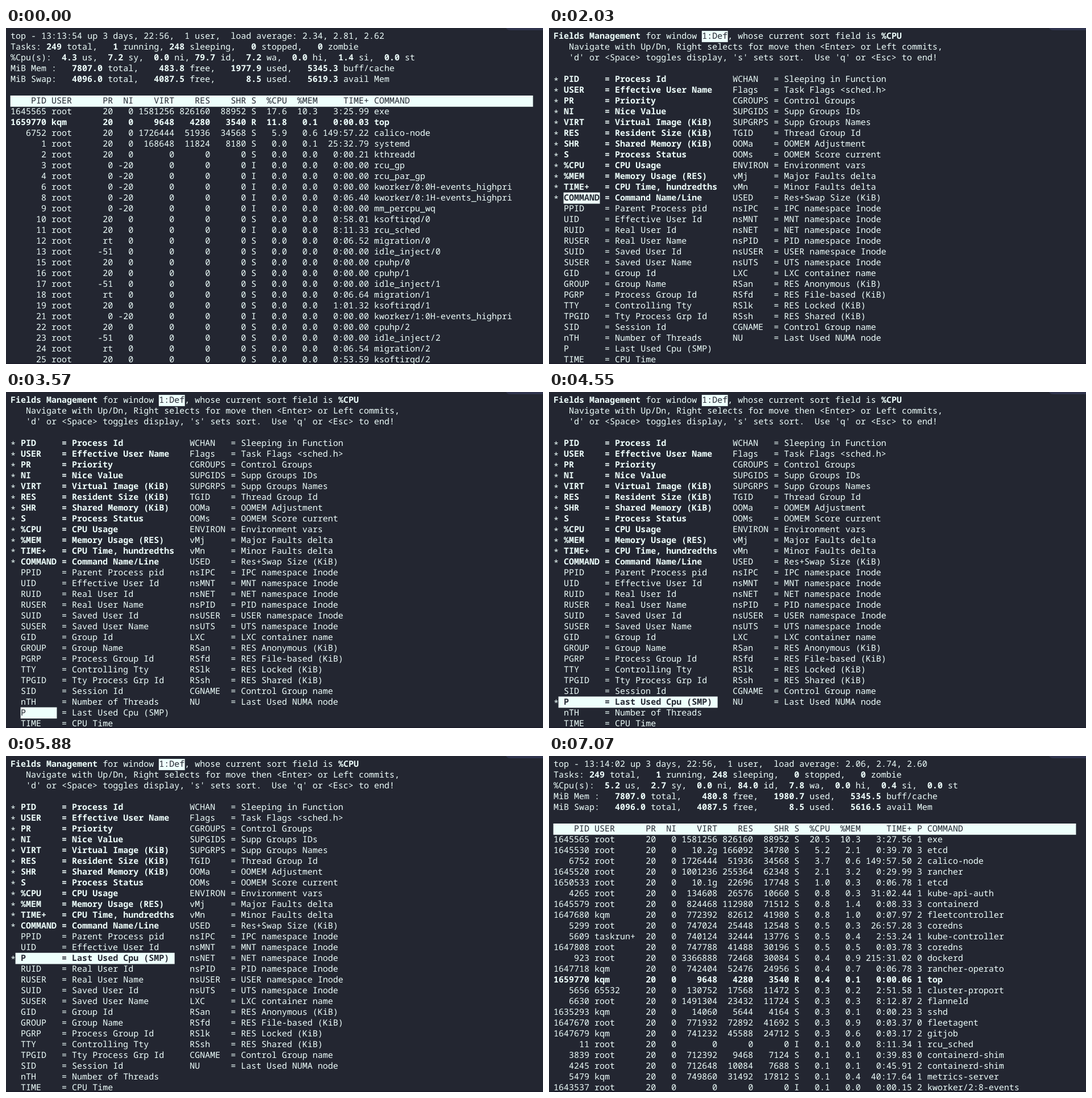
These frames come from a looping animation (945x592 px, 8.47 s). An HTML page:

```html
<!DOCTYPE html>
<html lang="en">
<head>
<meta charset="utf-8">
<title>top: fields management</title>
<style>
  html, body { margin: 0; width: 100%; height: 100%; overflow: hidden; background: #232631; }
  svg { display: block; width: 945px; height: 592px; }
  text {
    font-family: "Noto Sans Mono", monospace;
    white-space: pre;
    text-rendering: geometricPrecision;
    font-variant-ligatures: none;
  }
</style>
</head>
<body>
<svg id="stage" viewBox="0 0 945 592">
  <rect width="945" height="592" fill="#232631"/>
  <path d="M880 0H945V4H888Q882 4 880 0Z" fill="#30344d"/>
  <rect y="590.5" width="945" height="1.5" fill="#1b1a29"/>
  <g id="screen"></g>
</svg>
<script>
const LOOP = 8470, OPEN = 420, TOGGLE = 3920, GRAB = 4130, CLOSE = 7070;
const LEFT = 8, TOP = 5.5, CELL = 9.01, LINE = 18.98, BASE = 13.8, PAD = 0.4;
const BG = '#232631', FG = '#eefffc';
const FIRST_ROW = 4, START = 8;

const screen = document.getElementById('screen');

// Font size at which one character fills one terminal cell
const pen = document.createElement('canvas').getContext('2d');
pen.font = '100px "Noto Sans Mono", monospace';
const SIZE = CELL / (pen.measureText('0').width / 100);

function add(tag, attrs, text) {
  const el = document.createElementNS('http://www.w3.org/2000/svg', tag);
  for (const k in attrs) el.setAttribute(k, attrs[k]);
  if (text) el.textContent = text;
  screen.appendChild(el);
}

const bar = (row, col, cols) => add('rect', {
  x: LEFT + col * CELL - PAD, y: TOP + row * LINE - PAD,
  width: cols * CELL + 2 * PAD, height: LINE + 2 * PAD, fill: FG
});

function print(row, col, str, bold, fill = FG) {
  for (const m of str.matchAll(/\S+/g)) {
    add('text', {
      x: LEFT + (col + m.index) * CELL, y: TOP + row * LINE + BASE,
      'font-size': SIZE, 'font-weight': bold ? 700 : 400, fill
    }, m[0]);
  }
}

// Every ~ switches bold on or off
function rich(row, str) {
  let col = 0;
  str.split('~').forEach((part, i) => {
    print(row, col, part, i % 2);
    col += part.length;
  });
}

/* ---- process list ---- */

// Right-aligned column widths; a negative width is left-aligned
const WIDTHS = [7, -9, 4, 4, 8, 7, 7, 2, 6, 6, 10];

function cells(values, hasCpu) {
  const widths = hasCpu ? [...WIDTHS, 2] : WIDTHS;
  return widths.map((w, i) =>
    w < 0 ? ' ' + values[i].padEnd(-w - 1) : values[i].padStart(w)
  ).join('') + ' ' + values[widths.length];
}

function drawTop({ summary, rows, hasCpu }) {
  summary.forEach((s, i) => rich(i, s));
  bar(6, 0, 102);
  const head = 'PID USER PR NI VIRT RES SHR S %CPU %MEM TIME+ ' + (hasCpu ? 'P COMMAND' : 'COMMAND');
  print(6, 0, cells(head.split(' '), hasCpu), false, BG);
  rows.forEach((r, i) => {
    const v = r.split(' ');
    print(7 + i, 0, cells(v, hasCpu), v[7] === 'R');
  });
}

// Idle kernel threads: pid, priority, nice, state, time, command
const idle = s => {
  const [pid, pr, ni, st, time, cmd] = s.split(' ');
  return `${pid} root ${pr} ${ni} 0 0 0 ${st} 0.0 0.0 ${time} ${cmd}`;
};

const before = {
  hasCpu: false,
  summary: [
    'top - 13:13:54 up 3 days, 22:56,  1 user,  load average: 2.34, 2.81, 2.62',
    'Tasks: ~249 ~total,   ~1 ~running, ~248 ~sleeping,   ~0 ~stopped,   ~0 ~zombie',
    '%Cpu(s):  ~4.3 ~us,  ~7.2 ~sy,  ~0.0 ~ni, ~79.7 ~id,  ~7.2 ~wa,  ~0.0 ~hi,  ~1.4 ~si,  ~0.0 ~st',
    'MiB Mem :   ~7807.0 ~total,    ~483.8 ~free,   ~1977.9 ~used,   ~5345.3 ~buff/cache',
    'MiB Swap:   ~4096.0 ~total,   ~4087.5 ~free,      ~8.5 ~used.   ~5619.3 ~avail Mem'
  ],
  rows: [
    '1645565 root 20 0 1581256 826160 88952 S 17.6 10.3 3:25.99 exe',
    '1659770 kqm 20 0 9648 4280 3540 R 11.8 0.1 0:00.03 top',
    '6752 root 20 0 1726444 51936 34568 S 5.9 0.6 149:57.22 calico-node',
    '1 root 20 0 168648 11824 8180 S 0.0 0.1 25:32.79 systemd',
    ...[
      '2 20 0 S 0:00.21 kthreadd',
      '3 0 -20 I 0:00.00 rcu_gp',
      '4 0 -20 I 0:00.00 rcu_par_gp',
      '6 0 -20 I 0:00.00 kworker/0:0H-events_highpri',
      '8 0 -20 I 0:06.40 kworker/0:1H-events_highpri',
      '9 0 -20 I 0:00.00 mm_percpu_wq',
      '10 20 0 S 0:58.01 ksoftirqd/0',
      '11 20 0 I 8:11.33 rcu_sched',
      '12 rt 0 S 0:06.52 migration/0',
      '13 -51 0 S 0:00.00 idle_inject/0',
      '15 20 0 S 0:00.00 cpuhp/0',
      '16 20 0 S 0:00.00 cpuhp/1',
      '17 -51 0 S 0:00.00 idle_inject/1',
      '18 rt 0 S 0:06.64 migration/1',
      '19 20 0 S 1:01.32 ksoftirqd/1',
      '21 0 -20 I 0:00.00 kworker/1:0H-events_highpri',
      '22 20 0 S 0:00.00 cpuhp/2',
      '23 -51 0 S 0:00.00 idle_inject/2',
      '24 rt 0 S 0:06.54 migration/2',
      '25 20 0 S 0:53.59 ksoftirqd/2'
    ].map(idle)
  ]
};

const after = {
  hasCpu: true,
  summary: [
    'top - 13:14:02 up 3 days, 22:56,  1 user,  load average: 2.06, 2.74, 2.60',
    before.summary[1],
    '%Cpu(s):  ~5.2 ~us,  ~2.7 ~sy,  ~0.0 ~ni, ~84.0 ~id,  ~7.8 ~wa,  ~0.0 ~hi,  ~0.4 ~si,  ~0.0 ~st',
    'MiB Mem :   ~7807.0 ~total,    ~480.8 ~free,   ~1980.7 ~used,   ~5345.5 ~buff/cache',
    'MiB Swap:   ~4096.0 ~total,   ~4087.5 ~free,      ~8.5 ~used.   ~5616.5 ~avail Mem'
  ],
  rows: [
    '1645565 root 20 0 1581256 826160 88952 S 20.5 10.3 3:27.56 1 exe',
    '1645530 root 20 0 10.2g 166092 34780 S 5.2 2.1 0:39.70 3 etcd',
    '6752 root 20 0 1726444 51936 34568 S 3.7 0.6 149:57.50 2 calico-node',
    '1645520 root 20 0 1001236 255364 62348 S 2.1 3.2 0:29.99 3 rancher',
    '1650533 root 20 0 10.1g 22696 17748 S 1.0 0.3 0:06.78 1 etcd',
    '4265 root 20 0 134608 26576 10660 S 0.8 0.3 31:02.44 1 kube-api-auth',
    '1645579 root 20 0 824468 112980 71512 S 0.8 1.4 0:08.33 3 containerd',
    '1647680 kqm 20 0 772392 82612 41980 S 0.8 1.0 0:07.97 2 fleetcontroller',
    '5299 root 20 0 747024 25448 12548 S 0.5 0.3 26:57.28 3 coredns',
    '5609 taskrun+ 20 0 740124 32444 13776 S 0.5 0.4 2:53.24 1 kube-controller',
    '1647808 root 20 0 747788 41488 30196 S 0.5 0.5 0:03.78 3 coredns',
    '923 root 20 0 3366888 72468 30084 S 0.4 0.9 215:31.02 0 dockerd',
    '1647718 kqm 20 0 742404 52476 24956 S 0.4 0.7 0:06.78 3 rancher-operato',
    '1659770 kqm 20 0 9648 4280 3540 R 0.4 0.1 0:00.06 1 top',
    '5656 65532 20 0 130752 17568 11472 S 0.3 0.2 2:51.58 1 cluster-proport',
    '6630 root 20 0 1491304 23432 11724 S 0.3 0.3 8:12.87 2 flanneld',
    '1635293 kqm 20 0 14060 5644 4164 S 0.3 0.1 0:00.23 3 sshd',
    '1647670 root 20 0 771932 72892 41692 S 0.3 0.9 0:03.37 0 fleetagent',
    '1647679 kqm 20 0 741232 45588 24712 S 0.3 0.6 0:03.17 2 gitjob',
    '11 root 20 0 0 0 0 I 0.1 0.0 8:11.34 1 rcu_sched',
    '3839 root 20 0 712392 9468 7124 S 0.1 0.1 0:39.83 0 containerd-shim',
    '4245 root 20 0 712648 10084 7688 S 0.1 0.1 0:45.91 2 containerd-shim',
    '5479 kqm 20 0 749860 31492 17812 S 0.1 0.4 40:17.64 1 metrics-server',
    '1643537 root 20 0 0 0 0 I 0.1 0.0 0:00.15 2 kworker/2:8-events'
  ]
};

/* ---- field list ---- */

const parse = s => s.split('|').map(f => f.split('='));

const fields = parse('PID=Process Id|USER=Effective User Name|PR=Priority|NI=Nice Value|VIRT=Virtual Image (KiB)|' +
  'RES=Resident Size (KiB)|SHR=Shared Memory (KiB)|S=Process Status|%CPU=CPU Usage|%MEM=Memory Usage (RES)|' +
  'TIME+=CPU Time, hundredths|COMMAND=Command Name/Line|PPID=Parent Process pid|UID=Effective User Id|' +
  'RUID=Real User Id|RUSER=Real User Name|SUID=Saved User Id|SUSER=Saved User Name|GID=Group Id|' +
  'GROUP=Group Name|PGRP=Process Group Id|TTY=Controlling Tty|TPGID=Tty Process Grp Id|SID=Session Id|' +
  'nTH=Number of Threads|P=Last Used Cpu (SMP)|TIME=CPU Time');
const P_INDEX = 25;
const shown = new Set(fields.slice(0, 12));

const extra = parse('WCHAN=Sleeping in Function|Flags=Task Flags <sched.h>|CGROUPS=Control Groups|' +
  'SUPGIDS=Supp Groups IDs|SUPGRPS=Supp Groups Names|TGID=Thread Group Id|OOMa=OOMEM Adjustment|' +
  'OOMs=OOMEM Score current|ENVIRON=Environment vars|vMj=Major Faults delta|vMn=Minor Faults delta|' +
  'USED=Res+Swap Size (KiB)|nsIPC=IPC namespace Inode|nsMNT=MNT namespace Inode|nsNET=NET namespace Inode|' +
  'nsPID=PID namespace Inode|nsUSER=USER namespace Inode|nsUTS=UTS namespace Inode|LXC=LXC container name|' +
  'RSan=RES Anonymous (KiB)|RSfd=RES File-based (KiB)|RSlk=RES Locked (KiB)|RSsh=RES Shared (KiB)|' +
  'CGNAME=Control Group name|NU=Last Used NUMA node');

// Key presses; held keys repeat every 70 ms
const hold = (from, n) => Array.from({ length: n }, (_, i) => from + i * 70);
const downs = [1120, 1470, ...hold(2030, 4), ...hold(2380, 4), ...hold(2730, 3), 3010, 3220, 3430, 3570];
const ups = [4550, ...hold(5110, 5), ...hold(5530, 4), ...hold(5880, 2), 6090, 6300];
const count = (times, t) => times.filter(x => x <= t).length;

function drawFields(cursor, toggled, grabbed) {
  rich(0, '~Fields Management~ for window      , whose current sort field is ~%CPU');
  bar(0, 29, 5);
  print(0, 29, '1:Def', false, BG);
  print(1, 3, 'Navigate with Up/Dn, Right selects for move then <Enter> or Left commits,');
  print(2, 3, "'d' or <Space> toggles display, 's' sets sort.  Use 'q' or <Esc> to end!");

  const list = [...fields];
  const moved = fields[P_INDEX];
  if (grabbed) list.splice(cursor, 0, ...list.splice(P_INDEX, 1));

  // The highlight goes below all text so that it never clips a neighbouring row
  if (grabbed) bar(FIRST_ROW + cursor, 1, 31);
  else bar(FIRST_ROW + cursor, 2, 7);

  list.forEach((f, i) => {
    const row = FIRST_ROW + i, here = i === cursor;
    const on = shown.has(f) || (toggled && f === moved);
    if (on) print(row + 0.13, 0, '*');
    print(row, 2, f[0], on, here ? BG : FG);
    print(row, 10, '= ' + f[1], on, here && grabbed ? BG : FG);
  });
  extra.forEach((f, i) => print(FIRST_ROW + i, 35, f[0].padEnd(8) + '= ' + f[1]));
}

/* ---- clock ---- */

let last = '';

function render(t) {
  const page = t < OPEN ? 'before' : t < CLOSE ? 'fields' : 'after';
  const cursor = START + count(downs, t) - count(ups, t);
  const key = [page, cursor, t >= TOGGLE, t >= GRAB].join();
  if (key === last) return;
  last = key;
  screen.replaceChildren();
  if (page === 'fields') drawFields(cursor, t >= TOGGLE, t >= GRAB);
  else drawTop(page === 'before' ? before : after);
}

const start = performance.now();
function tick() {
  render((performance.now() - start) % LOOP);
  requestAnimationFrame(tick);
}
tick();
</script>
</body>
</html>
```
